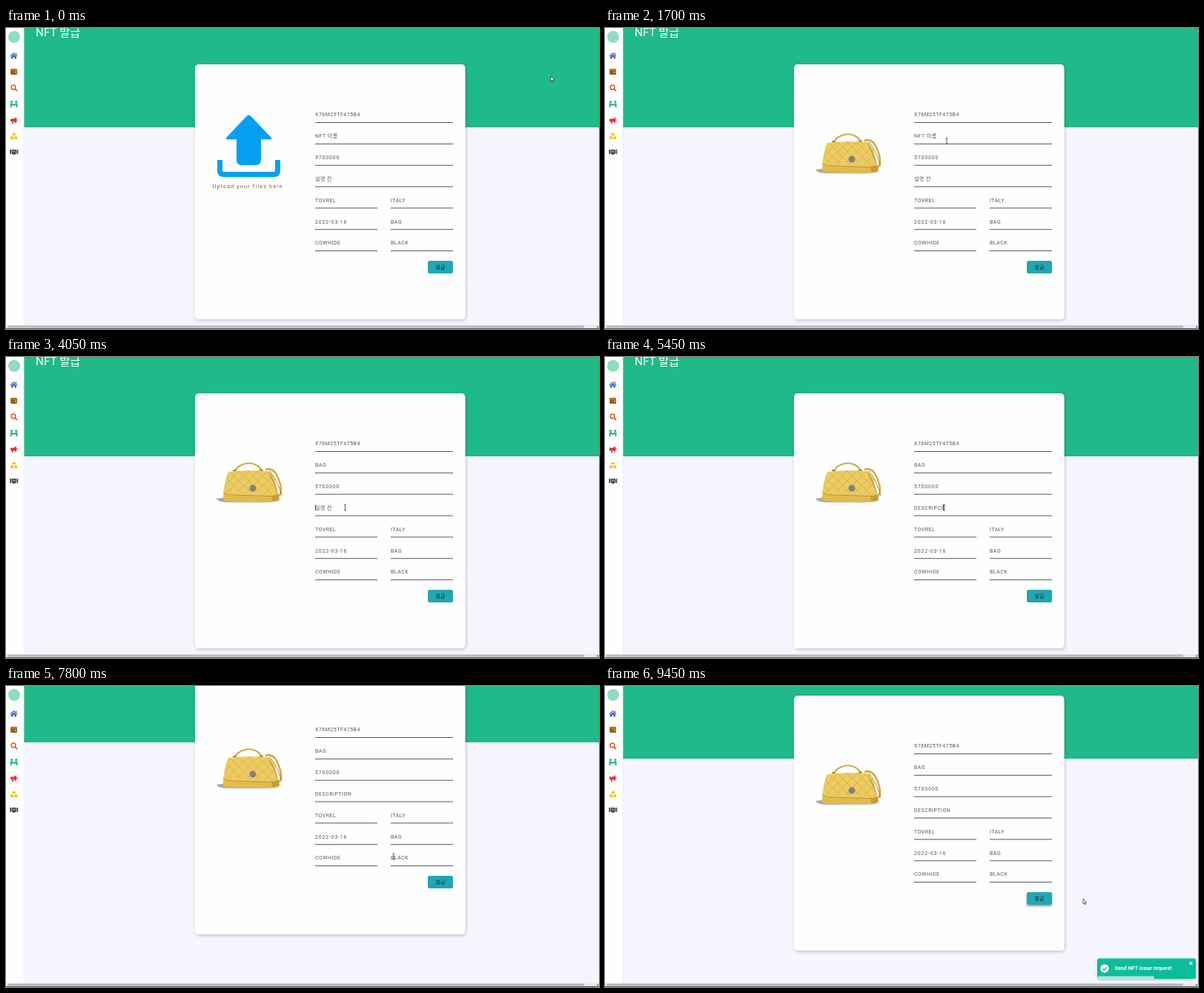
Animation, 800 px wide and 406 px high, one loop 9500 ms. Source, as an HTML page:

```html
<!DOCTYPE html>
<html lang="ko">
<head>
<meta charset="utf-8">
<title>NFT 발급</title>
<style>
  html, body { margin: 0; width: 100%; height: 100%; overflow: hidden; background: #f4f5fd; }
  svg { display: block; width: 100vw; height: 100vh; }
  text { font-family: Roboto, "Noto Sans CJK KR", "Noto Sans CJK", sans-serif; }
  .field { font-size: 7px; fill: #555; }
  .hint { font-size: 7px; }
</style>
</head>
<body>
<svg viewBox="0 0 800 406" xmlns="http://www.w3.org/2000/svg">
  <defs>
    <filter id="soft" x="-10%" y="-10%" width="120%" height="120%">
      <feDropShadow dx="1" dy="1.5" stdDeviation="2" flood-color="#000" flood-opacity=".22"/>
    </filter>
    <filter id="lift" x="-30%" y="-40%" width="160%" height="200%">
      <feDropShadow dx="0" dy="2" stdDeviation="1.8" flood-color="#000" flood-opacity=".4"/>
    </filter>
    <linearGradient id="hide" x1="0" y1="0" x2="0" y2="1">
      <stop offset="0" stop-color="#eed06a"/><stop offset="1" stop-color="#dfb849"/>
    </linearGradient>
    <linearGradient id="shade" x1="0" y1="0" x2="1" y2="0">
      <stop offset="0" stop-color="#aaa49b"/><stop offset="1" stop-color="#d9d5cc"/>
    </linearGradient>
    <pattern id="quilt" width="13" height="13" patternUnits="userSpaceOnUse" patternTransform="translate(301 154)">
      <path d="M0 0L13 13M13 0L0 13" stroke="#c99f38" stroke-width=".7" fill="none"/>
    </pattern>
    <pattern id="dots" width="3" height="4" patternUnits="userSpaceOnUse">
      <rect width="3" height="4" fill="#8ee2cf"/><rect width="1.6" height="4" fill="#c3f1e6"/>
    </pattern>
  </defs>

  <rect width="800" height="406" fill="#f4f5fd"/>
  <g id="page">
    <rect x="24" y="-10" width="776" height="144" fill="#20b98a"/>
    <text x="40" y="10.5" font-size="15.3" fill="#fff">NFT 발급</text>
    <rect x="255" y="49" width="364.5" height="344" rx="5" fill="#fefefe" filter="url(#soft)"/>

    <g id="upload">
      <path d="M327.500 117.500Q329 117.500 330 118.500L358 148Q359.500 150.200 356 150.200H344V178Q344 185 337 185H318Q311 185 311 178V150.200H299Q295.500 150.200 297 148L325 118.500Q326 117.500 327.500 117.500Z" fill="#049ff5"/>
      <path d="M288.500 178V192Q288.500 197.500 294 197.500H361Q366.500 197.500 366.500 192V178" fill="none" stroke="#049ff5" stroke-width="7"/>
      <text x="278.500" y="215.500" font-size="7.5" letter-spacing="1.05" fill="#666">Upload your files here</text>
    </g>

    <g id="bag">
      <path d="M284 191Q300 188 330 192L371 193Q366 197 340 196.500L300 196Q286 196 284 191Z" fill="url(#shade)"/>
      <path d="M309 155Q310 149 318 145.500Q328 141 337 145.500Q344 149 345 155" fill="none" stroke="#d4ab43" stroke-width="2"/>
      <path d="M350 152Q358 149 364 157Q372 172 371 182Q369 190 361 190" fill="none" stroke="#d2aa45" stroke-width="2.600"/>
      <path d="M356 154Q366 166 372 187" fill="none" stroke="#88714b" stroke-width="1.200" stroke-dasharray="2 1"/>
      <path d="M301 155Q326 152 354 154Q361 157 364 172L369 192Q366 195.500 355 195.500L300 195Q293 194 292.500 190Q295 178 297 163Q298 157 301 155Z" fill="url(#hide)"/>
      <path d="M354 155Q363 165 369 192Q364 195 359 194Z" fill="#c79d37"/>
      <path d="M300 155Q326 152 353 154Q361 170 367 185Q364 188 353 187.500L303 186Q297 186 293 183Q296 163 300 155Z" fill="#ebcb62"/>
      <path d="M300 155Q326 152 353 154Q361 170 367 185L293 183Q296 163 300 155Z" fill="url(#quilt)" opacity=".8"/>
      <path d="M293 183Q298 186 306 186L353 187.500Q364 188 367 185" fill="none" stroke="#bd9334" stroke-width="1"/>
      <path d="M306 153h5M342 152.500h5" stroke="#b18a3a" stroke-width="2"/>
      <circle cx="333" cy="177" r="4.500" fill="#858078"/>
    </g>

    <g id="form"></g>
    <rect id="caret" width=".8" height="8" fill="#222"/>
    <rect id="button" x="569" y="314" width="34" height="17" rx="2.500" fill="#20a7b4"/>
    <text x="586" y="325.200" text-anchor="middle" font-size="7" fill="#1d2b2e">발급</text>
  </g>

  <rect width="24" height="402" fill="#fefefe"/>
  <path d="M24.300 0V401" stroke="#e4e6ee" stroke-width=".6"/>
  <circle cx="11" cy="12" r="8" fill="#8fdcc2"/>
  <g fill="#3f62bd">
    <path d="M5.500 37.500L10.500 33L15.500 37.500L14.700 38.400L10.500 34.600L6.300 38.400Z"/>
    <path d="M7 38.600L10.500 35.500L14 38.600V41.500H11.500V39H9.500V41.500H7ZM13 33.500h1.200v2.600l-1.200-1Z"/>
  </g>
  <g>
    <rect x="6.200" y="55" width="8.800" height="8" rx="1.200" fill="#9c5d0c"/>
    <path d="M7.500 56.600H14.500" stroke="#e1bd82" stroke-width=".7"/>
    <circle cx="13" cy="59.600" r=".8" fill="#fff"/>
  </g>
  <g fill="none" stroke="#dd5d2b">
    <circle cx="10" cy="80" r="2.900" stroke-width="1.500"/><path d="M12.200 82.200L15 85" stroke-width="1.800"/>
  </g>
  <g fill="#23b688">
    <circle cx="7.500" cy="99.500" r="1.600"/><circle cx="13.800" cy="99.500" r="1.600"/>
    <path d="M5.700 101.500H8.500L10.600 103L12.800 101.500H15.600V107H13.500V104L10.600 105L7.800 104V107H5.700Z"/>
  </g>
  <g fill="#e5333f">
    <path d="M6 122.500H9Q12 122.500 14 120V128.500Q12 126 9 126H6Z"/><path d="M7.500 126H9.500L10 129H8.200Z"/><rect x="14.300" y="123" width="1.200" height="2.500"/>
  </g>
  <g fill="#f6c51f">
    <path d="M8 145L9 141.800H12.200L13.200 145Z"/><path d="M5.600 150L6.700 146H9.600L10.500 150Z"/><path d="M11 150L11.700 146H14.500L15.700 150Z"/>
  </g>
  <g fill="#4c4c50">
    <path d="M5.300 164H7V170H5.300ZM14.600 164H16.300V170H14.600Z"/>
    <path d="M7.500 164.500L10 163.800L12 164L14.200 164.800V169L11.500 171L9.500 170.800L7.500 169Z"/>
    <path d="M10.500 165.200L9.300 166.700L10.700 167L11.800 166.200L13.500 168" fill="none" stroke="#fff" stroke-width=".6"/>
  </g>

  <g id="toast">
    <rect x="664" y="367.500" width="133" height="27.500" rx="2.500" fill="#07bc9b" filter="url(#soft)"/>
    <circle cx="674" cy="381" r="5.700" fill="#fff"/>
    <path d="M671.300 381.200L673.300 383.200L676.900 379.200" fill="none" stroke="#07bc9b" stroke-width="1.400"/>
    <text x="687.500" y="383.200" font-size="7.200" font-weight="700" fill="#fff">Send NFT issue request</text>
    <path d="M788.500 372L792.300 375.800M792.300 372L788.500 375.800" stroke="#fff" stroke-width="1.200"/>
    <rect id="bar" x="664" y="391.500" height="3.500" fill="url(#dots)"/>
  </g>

  <rect y="400.500" width="800" height="5.500" fill="#e9e9ec"/>
  <rect x="2" y="401.500" width="778" height="3" rx="1" fill="#b9b9bc"/>
  <rect y="405" width="800" height="1" fill="#55565a"/>
  <path d="M797.500 401.800L799.500 403.300L797.500 404.800Z" fill="#444"/>

  <g id="cursor">
    <path id="arrow" d="M0 0V6.800L1.600 5.400L2.600 7.800L3.700 7.300L2.700 5H4.700Z" fill="#fff" stroke="#222" stroke-width=".7"/>
    <path id="beam" d="M-1.500 -4Q0 -4 0 -3Q0 -4 1.500 -4M0 -3V3M-1.500 4Q0 4 0 3Q0 4 1.500 4" fill="none" stroke="#333" stroke-width=".8"/>
    <path id="hand" d="M0 0Q1.200 -.4 1.300 .7V3L4.500 3.600Q5.300 3.800 5.200 5L4.500 8H.8L-1.800 5Q-1.600 4 -.2 5V.7Q-.3 .2 0 0Z" fill="#fff" stroke="#222" stroke-width=".7"/>
  </g>
</svg>
<script>
const LOOP = 9500, LEFT = 417, MID = 519, RIGHT = 603;
const $ = id => document.getElementById(id);
const NS = "http://www.w3.org/2000/svg";

function add(tag, attrs, text = "") {
  const el = document.createElementNS(NS, tag);
  for (const k in attrs) el.setAttribute(k, attrs[k]);
  el.textContent = text;
  return $("form").appendChild(el);
}

const rowY = row => 127.5 + row * 28.85;

function field(row, x, end, value) {
  add("path", { d: `M${x} ${rowY(row)}H${end}`, stroke: "#555", "stroke-width": 1 });
  return add("text", {
    x, y: rowY(row) - 8.2, class: "field",
    "letter-spacing": /^[\d-]+$/.test(value) ? 0.8 : 0.5
  }, value);
}

field(0, LEFT, RIGHT, "X76M25TF475B4");
const nameText = field(1, LEFT, RIGHT, "NFT 이름");
field(2, LEFT, RIGHT, "5700000");
const infoText = field(3, LEFT, RIGHT, "설명 칸");
[["TOVREL", "ITALY"], ["2022-03-16", "BAG"], ["COWHIDE", "BLACK"]].forEach(([a, b], i) => {
  field(4 + i, LEFT, 501, a);
  field(4 + i, MID, RIGHT, b);
});

// Each input: focus time, blur time, then the value after each key press.
const inputs = [
  { el: nameText, row: 1, hint: "NFT 이름", from: 1800, to: 3650,
    keys: [[2450, "B"], [2650, "BA"], [2900, "BAG"]] },
  { el: infoText, row: 3, hint: "설명 칸", from: 3650, to: 6900,
    keys: [[4250, "D"], [4400, "DE"], [4550, "DES"], [4700, "DESC"], [4850, "DESCR"],
           [5000, "DESCRI"], [5150, "DESCRIP"], [5300, "DESCRIPC"], [5400, "DESCRIPCI"],
           [5700, "DESCRIPC"], [5850, "DESCRIP"], [6050, "DESCRIPT"], [6180, "DESCRIPTI"],
           [6300, "DESCRIPTIO"], [6430, "DESCRIPTION"]] }
];

// Time, x, y
const path = [
  [0, 735, 65], [250, 735, 65], [900, 328, 165], [1300, 328, 165], [1620, 461, 152.5],
  [1830, 461, 152.5], [2000, 376, 149], [3100, 376, 149], [3450, 477, 204],
  [3850, 457.500, 203], [6480, 457.500, 203], [6850, 586, 318], [7200, 586, 318],
  [7700, 523, 230], [7950, 523, 230], [8300, 434, 85], [8370, 434, 85],
  [8560, 587, 285], [8720, 587, 285], [9150, 645, 287], [LOOP, 645, 287]
];
const scrolls = [[0, 0], [7150, 0], [7450, 58], [8000, 58], [8250, 36], [LOOP, 36]];

const clamp = v => Math.max(0, Math.min(1, v));
const ease = v => v * v * (3 - 2 * v);

function at(keys, t) {
  let i = 1;
  while (i < keys.length - 1 && keys[i][0] <= t) i++;
  const a = keys[i - 1], b = keys[i];
  const k = ease(clamp((t - a[0]) / (b[0] - a[0])));
  return a.slice(1).map((v, n) => v + (b[n + 1] - v) * k);
}

const show = (el, on) => el.setAttribute("display", on ? "inline" : "none");

function cursorKind(x, y, t) {
  if (x > 569 && x < 603 && y > 314 && y < 331) return "hand";
  if (t < 1300 && x > 280 && x < 375 && y > 115 && y < 205) return "hand";
  const row = Math.round((y - 117) / 28.85);
  const inRow = row >= 0 && row < 7 && Math.abs(y - 117 - row * 28.85) < 11;
  return inRow && x > LEFT && x < RIGHT && (row < 4 || x < 501 || x > MID) ? "beam" : "arrow";
}

function drawInputs(t) {
  let caret = false;
  for (const { el, row, hint, from, to, keys } of inputs) {
    const last = keys.filter(k => k[0] <= t).pop();
    el.textContent = last ? last[1] : hint;
    const since = t - (last ? last[0] : from);
    if (t >= from && t < to && since % 1060 < 530) {
      caret = true;
      $("caret").setAttribute("x", LEFT + (last ? el.getComputedTextLength() : 0));
      $("caret").setAttribute("y", rowY(row) - 15);
    }
  }
  show($("caret"), caret);
}

function slide(t) {
  const keys = [[8600, 150], [9000, -5], [9130, 2], [9250, 0]];
  return at(keys, t)[0];
}

function draw(t) {
  const [scroll] = at(scrolls, t), [x, y] = at(path, t);
  $("page").setAttribute("transform", `translate(0 ${-scroll})`);
  show($("upload"), t < 1300);
  show($("bag"), t >= 1300);
  drawInputs(t);

  const kind = cursorKind(x, y + scroll, t);
  for (const id of ["arrow", "beam", "hand"]) show($(id), id === kind);
  $("cursor").setAttribute("transform", `translate(${x} ${y})`);
  $("button").setAttribute("filter", t > 8600 || kind === "hand" && t > 1300 ? "url(#lift)" : "none");

  show($("toast"), t >= 8600);
  $("toast").setAttribute("transform", `translate(${slide(t)} 0)`);
  $("bar").setAttribute("width", 133 * (1 - clamp((t - 8600) / 2000)));
}

function tick(now) {
  draw(now % LOOP);
  requestAnimationFrame(tick);
}
draw(0);
requestAnimationFrame(tick);
</script>
</body>
</html>
```
